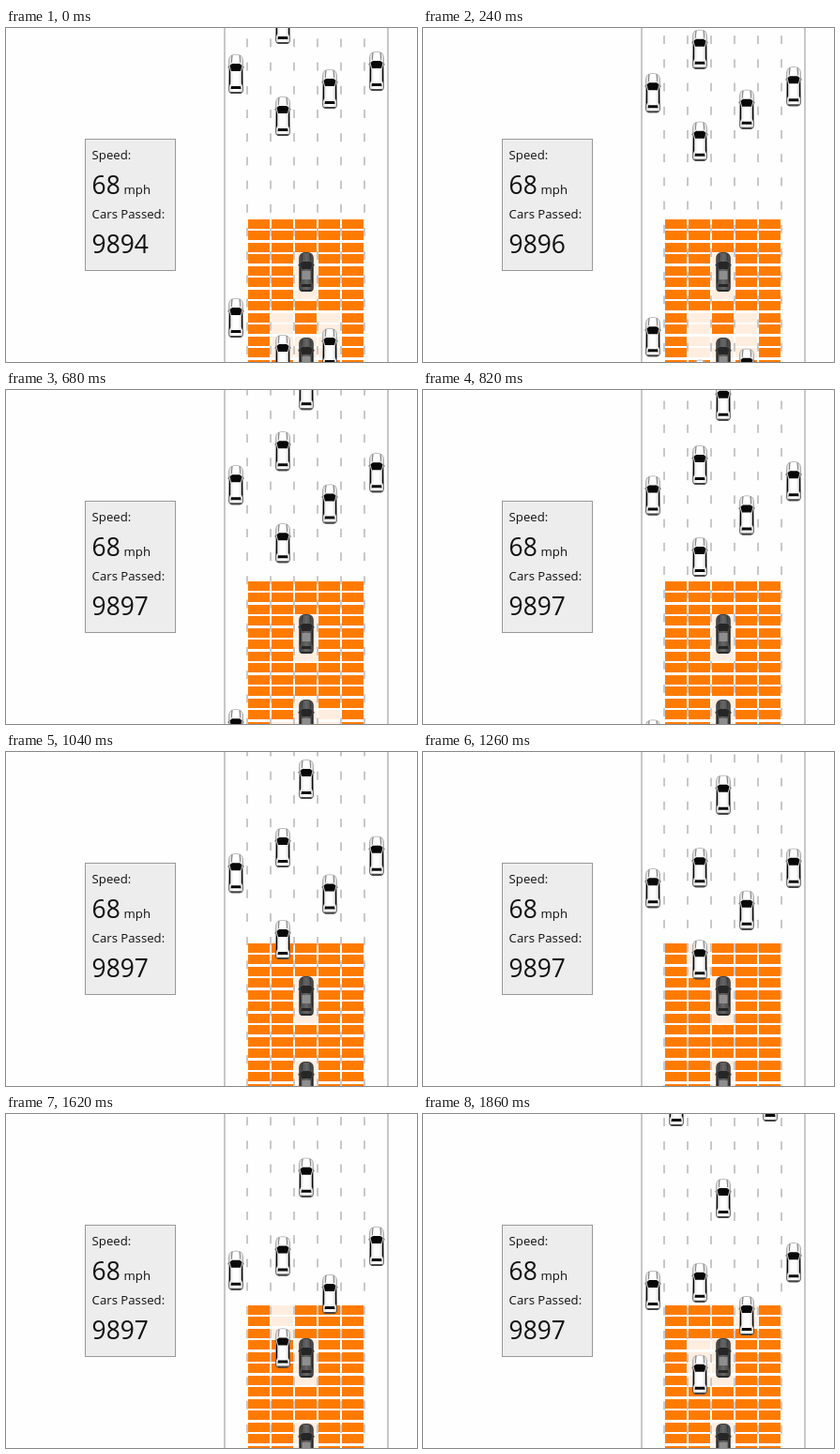
Write an HTML page with a canvas that moves like this. It is 438x356 px and loops after 1920 ms.

```html
<!DOCTYPE html>
<html lang="en">
<head>
<meta charset="utf-8">
<title>Traffic simulation</title>
<style>
html, body { margin: 0; width: 438px; height: 356px; overflow: hidden; background: #fefefe; }
canvas, svg { position: absolute; left: 0; top: 0; display: block; }
text { font: 13.2px "Open Sans", "Noto Sans", sans-serif; fill: #111; }
.big { font-size: 26.4px; }
</style>
</head>
<body>
<canvas id="road" width="438" height="356"></canvas>
<svg width="438" height="356">
  <rect x="84.5" y="118.5" width="96" height="140" fill="#ededed" stroke="#999"/>
  <text x="91.6" y="140">Speed:</text>
  <text x="91.6" y="177" class="big">68</text>
  <text x="125.6" y="177">mph</text>
  <text x="91.6" y="203">Cars Passed:</text>
  <text x="91.6" y="240" class="big" id="passed">9894</text>
</svg>
<script>
const ctx = document.getElementById("road").getContext("2d");
const passed = document.getElementById("passed");

// Step lengths in units of 10 ms.
const rhythm = "66666" + "886".repeat(4) + "8886" + "886".repeat(2);
const steps = [...rhythm].map(d => d * 10);
const loop = steps.reduce((a, b) => a + b);

// Per lane: drift of its cars per px of road, and where they start.
const lanes = [
  { drift: .28, starts: [49, 309] },
  { drift: .3, starts: [-157] },
  { drift: .37, starts: [94, -4, 348] },
  { drift: .29, starts: [-54] },
  { drift: .302, starts: [65, 341] },
  { drift: .3, starts: [-162] },
  { drift: .226, starts: [46] }
];
const cars = lanes.flatMap(({ drift, starts }, lane) => starts.map(y => ({ lane, y, drift })));
const agents = [260, 351].map(y => ({ lane: 3, y, drift: 0 }));

const LANE = 25, ROW = 12.5, GRID_TOP = 203.75;
const LOOK = 125, LOOK_START = 90;

const laneX = lane => 245 + lane * LANE;
const yAt = (car, dist) => car.y + car.drift * dist;

function stepAt(t) {
  let i = 0;
  while (t >= steps[i]) t -= steps[i++];
  return i;
}

// Steady speed with one short slowdown at the start.
const distAt = step => 19.1 * step - 5.2 * Math.max(0, Math.sin(Math.PI * step / 14));

function poly(color, ...pts) {
  ctx.fillStyle = color;
  ctx.beginPath();
  for (let i = 0; i < pts.length; i += 2) ctx.lineTo(pts[i], pts[i + 1]);
  ctx.fill();
}

// Same shape on both sides of the car's axis.
function mirrored(color, ...pts) {
  poly(color, ...pts);
  poly(color, ...pts.map((v, i) => i % 2 ? v : -v));
}

function shell(w, h, r, paint) {
  ctx.fillStyle = paint;
  ctx.beginPath();
  ctx.roundRect(-w / 2, -h / 2, w, h, r);
  ctx.fill();
}

function fade(x0, y0, x1, y1, ...colors) {
  const g = ctx.createLinearGradient(x0, y0, x1, y1);
  colors.forEach((c, i) => g.addColorStop(i / (colors.length - 1), c));
  return g;
}

function drawCar(x, y, dark) {
  ctx.save();
  ctx.translate(x, y);
  const glass = dark ? "#262626" : "#080808";
  const trim = dark ? "#333" : "#666";
  mirrored(trim, 6, -9, 8.5, -8, 8.5, -6.5, 6, -6);
  shell(15.5, 42, [6, 6, 4, 4], dark ? "#333" : fade(0, -21, 0, 21, "#aaa", "#777", "#333"));
  shell(14, 40.5, [5, 5, 3, 3], dark
    ? fade(-7, 0, 7, 0, "#444", "#666", "#444")
    : fade(-7, 0, 7, 0, "#d8d8d8", "#fff", "#fff", "#d8d8d8"));
  mirrored(trim, 3.5, -20, 4.5, -20, 5, -12, 4.3, -12);
  poly(glass, -6.5, -9, -4, -11, 4, -11, 6.5, -9, 5, -3, -5, -3);
  mirrored(glass, 7, -7, 5.8, -2, 5.8, 10, 7, 13);
  poly(glass, -5, 13, 5, 13, 5.5, 16, -5.5, 16);
  poly(dark ? "#2a2a2a" : "#444", -6, 19, 6, 19, 5, 21, -5, 21);
  if (dark) {
    ctx.fillStyle = "#8e8e8e";
    ctx.fillRect(-4.5, -1, 9, 9);
  }
  ctx.restore();
}

// Cells taken by cars at the last look around.
function takenCells(dist) {
  const look = LOOK_START + LOOK * Math.floor((dist - LOOK_START) / LOOK);
  const taken = new Set();
  for (const car of [...cars, ...agents]) {
    const nudge = car.drift ? 0 : 3;
    const first = Math.floor((yAt(car, look) - 21 + nudge - GRID_TOP) / ROW);
    for (let r = first; r < first + 4; r++) taken.add(car.lane + ":" + r);
  }
  return taken;
}

function drawRoad(dist) {
  ctx.fillStyle = "#fefefe";
  ctx.fillRect(0, 0, 438, 356);
  ctx.fillStyle = "#c8c8c8";
  ctx.fillRect(232, 0, 2, 356);
  ctx.fillRect(406, 0, 2, 356);
  const gap = 25.2;
  for (let y = (87 + dist) % gap - gap; y < 356; y += gap)
    for (let i = 0; i < 6; i++) ctx.fillRect(256 + i * LANE, y, 2, 9);
}

function drawGrid(dist) {
  const taken = takenCells(dist);
  for (let r = 0; r < 13; r++)
    for (let lane = 1; lane < 6; lane++) {
      ctx.fillStyle = taken.has(lane + ":" + r) ? "#ffeee0" : "#ff7b00";
      ctx.fillRect(233 + lane * LANE, Math.round(GRID_TOP + r * ROW), 23, 10);
    }
}

let shown = -1;
function draw(now) {
  const step = stepAt(now % loop);
  if (step === shown) return;
  shown = step;
  const dist = distAt(step);
  drawRoad(dist);
  drawGrid(dist);
  for (const car of cars) drawCar(laneX(car.lane), yAt(car, dist), false);
  for (const car of agents) drawCar(laneX(car.lane), car.y, true);
  passed.textContent = 9894 + cars.filter(car => yAt(car, dist) > 357).length;
}

const start = performance.now();
function tick() {
  draw(performance.now() - start);
  requestAnimationFrame(tick);
}
tick();
</script>
</body>
</html>
```
